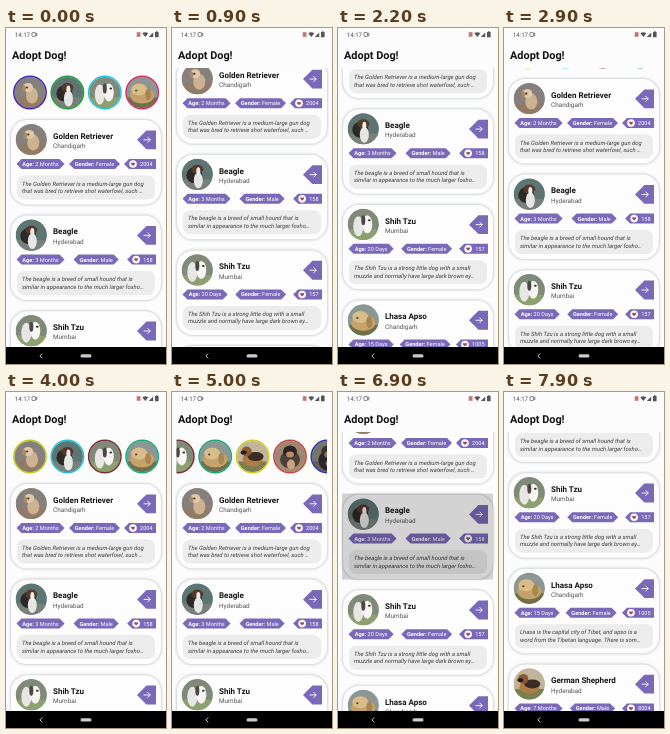
These frames come from a looping animation (160x336 px, 8000 ms). An HTML page:

```html
<!DOCTYPE html>
<html lang="en">
<head>
<meta charset="utf-8">
<title>Adopt Dog!</title>
<style>
html, body { margin: 0; width: 100%; height: 100%; overflow: hidden; background: #fbfcfb; }
svg { display: block; width: 100%; height: 100%; font-family: Roboto, sans-serif; text-rendering: geometricPrecision; }
.title { font: 700 10.9px Roboto, sans-serif; fill: #111; }
.name { font-size: 8px; font-weight: 700; fill: #161616; }
.city { font-size: 6.4px; fill: #555; }
.chip { font-size: 5.6px; fill: #fff; }
.chip tspan { font-weight: 700; }
.about { font-size: 5.9px; font-style: italic; fill: #3c3c3c; }
.card { fill: #fcfdfc; filter: drop-shadow(0 .8px 1.5px rgba(40,45,65,.38)); }
.accent { fill: #7a68b8; }
</style>
</head>
<body>
<svg viewBox="0 0 160 336" preserveAspectRatio="none">
  <defs>
    <clipPath id="page"><rect y="40" width="160" height="279"/></clipPath>
    <clipPath id="strip"><rect x="4.5" y="44" width="150.5" height="41"/></clipPath>
    <clipPath id="round"><circle r="15.6"/></clipPath>
  </defs>
  <rect width="160" height="336" fill="#fbfcfb"/>
  <g clip-path="url(#page)"><g id="list">
    <g clip-path="url(#strip)"><g id="row"></g></g>
    <g id="cards"></g>
  </g></g>
  <text x="8.7" y="8.8" font-size="6.2" fill="#555">14:17</text>
  <g fill="none" stroke="#666" stroke-width=".8">
    <rect x="26" y="4.5" width="3.4" height="4" rx=".6"/><path d="M29.4 6l1.4-1v3l-1.4-1"/>
  </g>
  <rect x="130.7" y="4.2" width="3.8" height="4.6" fill="#c87474"/>
  <path d="M136.3 5.2q3-2 6 0l-3 3.8zM142.8 9h4.4V4.4zM149 4h1v-.8h1.6V4h1v5.2H149z" fill="#555"/>
  <text class="title" x="6" y="31">Adopt Dog!</text>
  <rect y="319" width="160" height="17" fill="#000"/>
  <path d="M36.2 325.5l-2.3 2.4 2.3 2.4" fill="none" stroke="#ccc" stroke-width="1"/>
  <rect x="74.5" y="326.3" width="11" height="3.2" rx="1.6" fill="#ccc"/>
</svg>
<script>
const DURATION = 8000, STEP = 100, PITCH = 95.6, TOP = 91;

const dogs = [
  { name: "Golden Retriever", city: "Chandigarh", age: "2 Months", sex: "Female", likes: "2004",
    about: ["The Golden Retriever is a medium-large gun dog", "that was bred to retrieve shot waterfowl, such …"] },
  { name: "Beagle", city: "Hyderabad", age: "3 Months", sex: "Male", likes: "158",
    about: ["The beagle is a breed of small hound that is", "similar in appearance to the much larger foxho…"] },
  { name: "Shih Tzu", city: "Mumbai", age: "20 Days", sex: "Female", likes: "157",
    about: ["The Shih Tzu is a strong little dog with a small", "muzzle and normally have large dark brown ey…"] },
  { name: "Lhasa Apso", city: "Chandigarh", age: "15 Days", sex: "Female", likes: "1005",
    about: ["Lhasa is the capital city of Tibet, and apso is a", "word from the Tibetan language. There is som…"] },
  { name: "German Shepherd", city: "Hyderabad", age: "7 Months", sex: "Male", likes: "8004",
    about: ["The German Shepherd is a breed of working", "dog of medium to large size, known for its …"] }
];

// Each portrait: backdrop, ground, then ellipses as [colour, x, y, rx, ry].
const portraits = [
  ["#85807c", "#927b66", ["#cdb291", 2, 3, 6, 8], ["#dfc8a8", -2, -5, 5, 4.5], ["#ab8a69", -6, -4, 2, 3], ["#4a3a30", -3, -5, 1.2, 1]],
  ["#5d7673", "#77817a", ["#2d2927", -3, 1, 8, 8], ["#e6e7e4", 1, 6, 4.5, 8], ["#55392a", 0, -5, 6, 4.5], ["#f0eee9", 1, -3, 2, 4]],
  ["#7f8a78", "#8ca070", ["#e8e6e4", -5, 2, 5, 10], ["#f7f5f3", 4, 0, 5, 9], ["#4c4744", 0, -4, 2, 5], ["#3b332f", 6, -4, 1.4, 1]],
  ["#8c9794", "#6f7048", ["#c6a26b", 0, 3, 12, 8], ["#d9bd88", -3, -3, 8, 6], ["#a98552", 6, 2, 3, 6], ["#65492f", -6, -2, 1.3, 1]],
  ["#c2b49a", "#77804f", ["#b17b48", 0, 3, 10, 7], ["#382c24", 3, 0, 8, 4.5], ["#8b5a35", -6, -5, 5, 5], ["#251e1a", -9, -4, 3, 2]],
  ["#a08672", "#a58b72", ["#4a403c", 0, 3, 10, 9], ["#2c2626", 0, -5, 7, 6], ["#b98d63", 0, -2, 4, 3], ["#c7a581", 1, 8, 4, 5]],
  ["#75766a", "#665c58", ["#29272b", 0, 4, 9, 10], ["#38302d", 0, -5, 6, 6], ["#9d6b43", 0, -2, 3, 3], ["#9d6b43", 1, 7, 3, 3]],
  ["#a08a70", "#a39478", ["#c7996a", 1, 4, 8, 9], ["#d7b58b", -2, -5, 6, 5], ["#8d6844", 4, -4, 2, 5], ["#332820", -4, -4, 1.4, 1]]
];

const rings = [
  ["#4329b8", "#249a3a", "#25c4e0", "#cf2c66", "#d4cc28", "#c24a40", "#3230b4", "#2a2cbc"],
  ["#bccc28", "#20c2d2", "#7a3038", "#18a67c", "#d4cc28", "#c24a40", "#3230b4", "#2a2cbc"]
];

// Scroll offsets as [ms, px].
const listPath = [[0, 0], [1600, 108], [2000, 125], [2900, 41], [3300, 11], [3650, 0], [5900, 0],
  [6300, 42], [6700, 80], [6850, 85], [7000, 85], [7300, 140], [7450, 140], [7900, 202]];
const rowPath = [[4200, 0], [4600, 45], [5100, 105], [5700, 139.4]];
const pressPath = [[6700, 0], [6900, 0.17], [7000, 0.17], [7200, 0]];

const byId = id => document.getElementById(id);
const at = (x, y, body) => `<g transform="translate(${x} ${y})">${body}</g>`;
const text = (cls, x, y, body, anchor = "start") =>
  `<text class="${cls}" x="${x}" y="${y}" text-anchor="${anchor}">${body}</text>`;

function portrait(i) {
  const [back, ground, ...blobs] = portraits[i];
  const shapes = blobs.map(([fill, x, y, rx, ry]) =>
    `<ellipse cx="${x}" cy="${y}" rx="${rx}" ry="${ry}" fill="${fill}"/>`).join("");
  return `<g clip-path="url(#round)"><circle r="16" fill="${back}"/>
    <rect x="-16" y="5" width="32" height="12" fill="${ground}"/>${shapes}</g>`;
}

const chipWidth = (label, value) => 11 + 2.85 * (label.length + value.length + 2);

function chip(centre, label, value) {
  const width = chipWidth(label, value);
  return `<path class="accent" d="M${centre - width / 2} 45l5-5h${width - 10}l5 5-5 5h${10 - width}z"/>` +
    text("chip", centre, 47, `<tspan>${label}:</tspan> ${value}`, "middle");
}

// The age chip sits left, the likes chip right, and the gender chip midway between them.
function chips({ age, sex, likes }) {
  const heart = 139.6 - likes.length * 3.15, left = heart - 9;
  const ageWidth = chipWidth("Age", age);
  return chip(10.5 + ageWidth / 2, "Age", age) +
    chip((11 + ageWidth + left) / 2, "Gender", sex) +
    `<path class="accent" d="M${left} 45l5-5H150v10H${left + 5}z"/>` +
    at(heart, 45, `<circle r="3.8" fill="#fff"/>
      <path d="M0 2L-2 0Q-2.2-1.7-.9-1.6L0-.8.9-1.6Q2.2-1.7 2 0z" fill="#a04a58"/>`) +
    text("chip", 146.6, 47, likes, "end");
}

function card(dog, i) {
  return at(0, TOP + i * PITCH, `
    <rect class="card" x="5" y="1" width="150" height="84.5" rx="16"/>
    ${at(25.3, 20.5, portrait(i))}
    ${text("name", 47, 19.8, dog.name)}${text("city", 47, 29.2, dog.city)}
    <path class="accent" d="M131 20.8l9.4-9.4h9.6v18.8h-9.6z"/>
    <path d="M137.6 20.8h6.6M141.5 18l2.8 2.8-2.8 2.8" fill="none" stroke="#fff" stroke-width=".9"/>
    ${chips(dog)}
    <rect x="11" y="56.5" width="138" height="24" rx="7" fill="#ececec"/>
    ${dog.about.map((line, n) => text("about", 16, 66.6 + n * 7.4, line)).join("")}
    <rect class="press" x="4" y="0" width="151" height="86" opacity="0"/>`);
}

byId("row").innerHTML = portraits.map((_, i) => at(24 + i * 37.4, 64.5,
  portrait(i) + '<circle class="ring" r="16.2" fill="none" stroke-width="1.5"/>')).join("");
byId("cards").innerHTML = dogs.map(card).join("");
const ringNodes = document.querySelectorAll(".ring");
const press = document.querySelectorAll(".press")[1];

function sample(path, t) {
  const next = path.findIndex(([time]) => time > t);
  if (next === 0) return path[0][1];
  if (next < 0) return path[path.length - 1][1];
  const [t0, a] = path[next - 1], [t1, b] = path[next];
  return a + (b - a) * (t - t0) / (t1 - t0);
}

function render(now) {
  const t = Math.floor(now % DURATION / STEP) * STEP;
  byId("list").setAttribute("transform", `translate(0 ${-sample(listPath, t)})`);
  byId("row").setAttribute("transform", `translate(${-sample(rowPath, t)} 0)`);
  press.setAttribute("opacity", sample(pressPath, t));
  const colours = rings[t < 1900 ? 0 : 1];
  ringNodes.forEach((node, i) => node.setAttribute("stroke", colours[i]));
}

const start = performance.now();
function tick() {
  render(performance.now() - start);
  requestAnimationFrame(tick);
}
tick();
</script>
</body>
</html>
```
